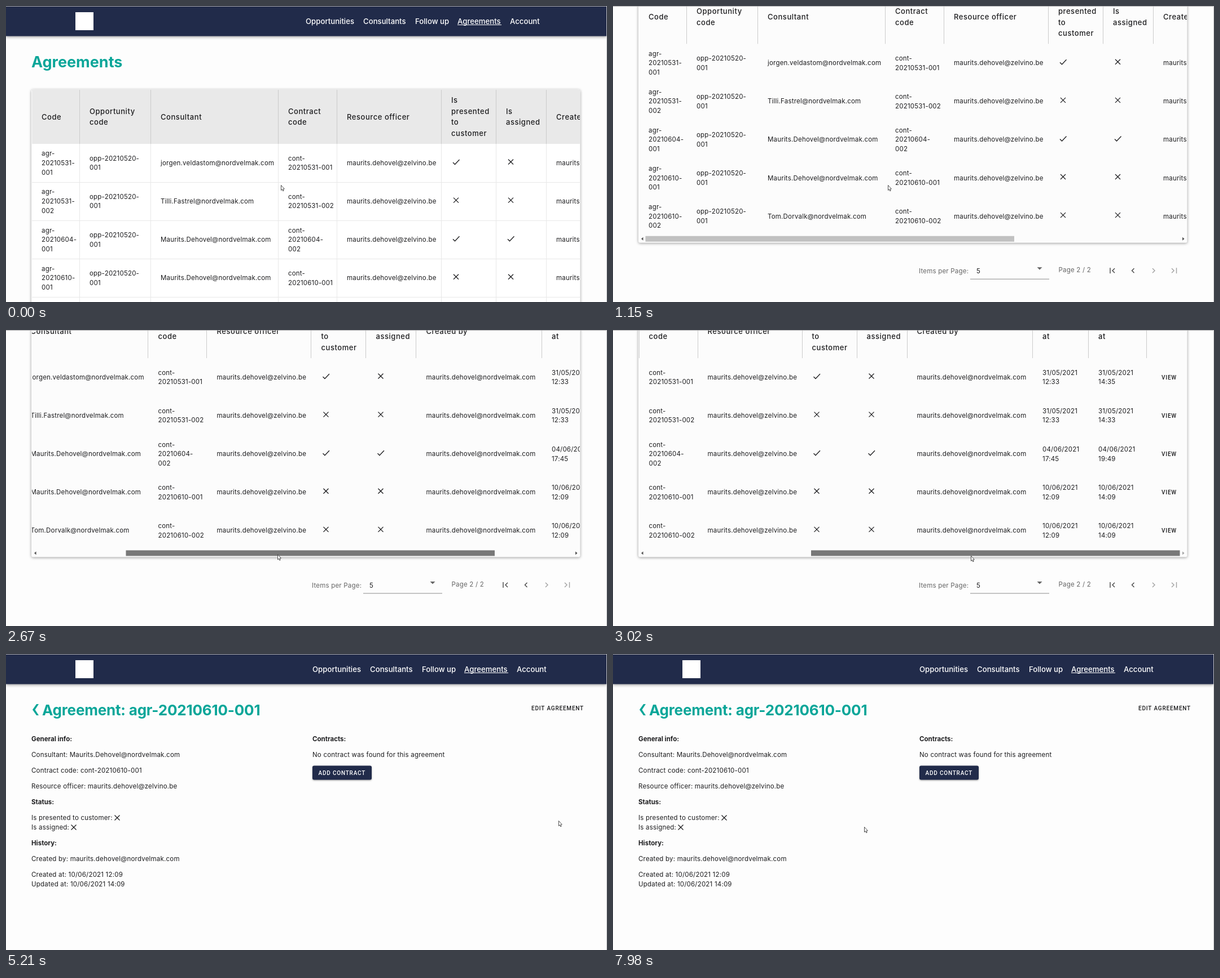
An HTML page with a canvas that plays this animation: 1065x526 px, repeating every 8 s.

```html
<!DOCTYPE html>
<html lang="en">
<head>
<meta charset="utf-8">
<title>Agreements</title>
<style>
html, body { margin: 0; width: 100%; height: 100%; overflow: hidden; background: #fdfdfd; }
canvas { display: block; }
</style>
</head>
<body>
<canvas id="stage" width="1065" height="526"></canvas>
<script>
const ctx = document.getElementById('stage').getContext('2d');
const W = 1065, H = 526, LOOP = 8000, OPEN = 4960;
const NAVY = '#212b4a', TEAL = '#0aa699', INK = '#1d1d1f';
const SANS = 'Inter, "Open Sans", sans-serif', CAPS = 'Roboto, Arial, sans-serif';

const FONT = {
  body: [`400 11.5px ${SANS}`, 0.2],
  bold: [`700 11.5px ${SANS}`, 0],
  head: [`500 13px ${SANS}`, 0.55],
  nav: [`500 13.2px ${SANS}`, 0],
  title: [`700 27px ${SANS}`, 0],
  detail: [`700 26px ${SANS}`, -0.2],
  button: [`500 10px ${CAPS}`, 0.8]
};

const OFFICER = 'maurits.dehovel@zelvino.be';
const CREATOR = 'maurits.dehovel@nordvelmak.com';
const CONSULTANT = 'Maurits.Dehovel@nordvelmak.com';

const COLS = [45, 131, 257, 483, 587, 772, 869, 958, 1180.5, 1279.5, 1382.5];
const HEADS = ['Code', 'Opportunity|code', 'Consultant', 'Contract|code', 'Resource officer',
  'Is|presented|to|customer', 'Is|assigned', 'Created by', 'Created|at', 'Updated|at', ''];
const row = (date, no, who, cont, shown, assigned, made, changed) => {
  const day = `${date.slice(6)}/${date.slice(4, 6)}/${date.slice(0, 4)}|`;
  return [`agr-|${date}-|${no}`, 'opp-20210520-|001', who, `cont-|${date}-${cont}`, OFFICER,
    shown, assigned, CREATOR, day + made, day + changed];
};
const ROWS = [
  row('20210531', '001', 'jorgen.veldastom@nordvelmak.com', '001', true, false, '12:33', '14:35'),
  row('20210531', '002', 'Tilli.Fastrel@nordvelmak.com', '002', false, false, '12:33', '14:33'),
  row('20210604', '001', CONSULTANT, '|002', true, true, '17:45', '19:49'),
  row('20210610', '001', CONSULTANT, '001', false, false, '12:09', '14:09'),
  row('20210610', '002', 'Tom.Dorvalk@nordvelmak.com', '002', false, false, '12:09', '14:09')
];

// Keyframes: [time, value], eased between neighbours.
const SCROLL = [[500, 0], [720, 80], [820, 80], [980, 160], [1040, 160], [1260, 195]];
const NAV_UP = [[600, 0], [720, 24], [900, 62]];
const CURSOR_X = [[1350, 487], [2130, 326], [2250, 326], [2320, 326.7], [3020, 634],
  [3100, 634], [3900, 972], [3930, 972], [4600, 979], [5200, 979], [6140, 689],
  [6880, 689], [7610, 449], [7940, 449], [7980, 445]];
const CURSOR_Y = [[1350, 318], [2130, 396], [2320, 396], [3020, 401], [3100, 401],
  [3900, 312], [3930, 312], [4600, 296], [5200, 296], [6140, 308],
  [6880, 308], [7250, 316], [7610, 308], [7940, 308], [7980, 307]];

function at(keys, t) {
  if (t <= keys[0][0]) return keys[0][1];
  for (let i = 1; i < keys.length; i++) {
    const [t0, a] = keys[i - 1], [t1, b] = keys[i];
    if (t < t1) {
      const p = (t - t0) / (t1 - t0);
      return a + (b - a) * p * p * (3 - 2 * p);
    }
  }
  return keys[keys.length - 1][1];
}

function rect(x, y, w, h, color) {
  ctx.fillStyle = color;
  ctx.fillRect(x, y, w, h);
}

function line(points, color, width = 1, close = false) {
  ctx.beginPath();
  points.forEach(([x, y]) => ctx.lineTo(x, y));
  if (close) ctx.closePath();
  ctx.strokeStyle = color;
  ctx.lineWidth = width;
  ctx.stroke();
}

function shape(points, color) {
  ctx.beginPath();
  points.forEach(([x, y]) => ctx.lineTo(x, y));
  ctx.closePath();
  ctx.fillStyle = color;
  ctx.fill();
}

function box(x, y, w, h, r, color, shadow = 0) {
  ctx.save();
  if (shadow) {
    ctx.shadowColor = 'rgba(0,0,0,.4)';
    ctx.shadowBlur = shadow;
    ctx.shadowOffsetY = 1;
  }
  ctx.beginPath();
  ctx.roundRect(x, y, w, h, r);
  ctx.fillStyle = color;
  ctx.fill();
  ctx.restore();
}

// y is the middle of the line
function text(str, x, y, font = 'body', color = INK) {
  const [face, gap] = FONT[font];
  ctx.font = face;
  ctx.letterSpacing = gap + 'px';
  ctx.fillStyle = color;
  ctx.fillText(str, x, y);
}

function lines(str, x, mid, step, font) {
  const parts = str.split('|');
  parts.forEach((s, i) => text(s, x, mid + (i - (parts.length - 1) / 2) * step, font));
}

function mark(x, y, yes) {
  if (yes) return line([[x - 5.5, y + 1], [x - 2, y + 4.5], [x + 6, y - 4]], INK, 1.3);
  line([[x - 4.5, y - 4.5], [x + 4.5, y + 4.5]], INK, 1.3);
  line([[x + 4.5, y - 4.5], [x - 4.5, y + 4.5]], INK, 1.3);
}

function drawNav(shift, up) {
  ctx.save();
  ctx.translate(0, -up);
  box(0, -10, 1064, 63.5, 0, NAVY, 5);
  rect(123, 11, 32, 32, '#fff');
  const links = [['Opportunities', 531], ['Consultants', 633], ['Follow up', 725],
    ['Agreements', 800], ['Account', 893]];
  links.forEach(([name, x]) => text(name, x + shift, 32, 'nav', '#fff'));
  rect(800 + shift, 33, 78, 1, '#fff');
  ctx.restore();
}

function drawTable(drag, faded, t, hover) {
  const hx = drag * 436.5 / 293.5;
  box(45, 148.5, 972.5, 450, 3, faded ? '#fcfcfc' : '#fff', 5);
  ctx.save();
  ctx.beginPath();
  ctx.rect(46, 149, 971, 449);
  ctx.clip();
  if (!faded) rect(46, 149, 971, 96, '#e9e9e9');
  ctx.translate(-hx, 0);
  COLS.forEach((x, i) => {
    if (i) {
      rect(Math.round(x - hx) + hx - 1, 149, 1, 96, '#cbcbcb');
      if (!faded) rect(x - 1, 245, 1, 340, '#e8e8e8');
      else if (t > 3400 && i > 5 && i < 10) rect(Math.round(x - hx) + hx - 1, 542, 1, 43, '#e8e8e8');
    }
    lines(HEADS[i], x + (i ? 17 : 18), 201.5, 19.5, 'head');
  });
  ROWS.forEach((cells, r) => {
    const mid = 279 + r * 68.1;
    if (!faded) rect(46, Math.round(mid + 33.5), 1410, 1, '#e8e8e8');
    cells.forEach((cell, i) => {
      const x = COLS[i] + (i ? 17 : 18);
      if (typeof cell === 'boolean') mark(x + 8.5, mid - 2, cell);
      else lines(cell, x, mid + 4, 16.7, 'body');
    });
    if (hover && r === 3) box(1399, mid - 12, 46, 24, 3, '#f5f6f7');
    text('VIEW', 1408.5, mid + 3.5, 'button');
  });
  ctx.restore();

  if (!faded) rect(46, 585, 971, 13, '#f1f1f1');
  const active = t > 2090 && t < 3100;
  rect(57.5 + drag, 586.5, 653.5, 10, active ? '#787878' : '#c1c1c1');
  shape([[50, 591.5], [53.5, 588.5], [53.5, 594.5]], '#505050');
  shape([[1012.5, 591.5], [1009, 588.5], [1009, 594.5]], drag > 293 ? '#a3a3a3' : '#505050');
}

function drawPager() {
  const grey = '#666', pale = '#a0a0a0', y = 648;
  text('Items per Page:', 542, 652.5, 'body', grey);
  text('5', 644, 653);
  rect(633, 662.5, 140, 1, '#8c8c8c');
  shape([[751.5, 642], [760.5, 642], [756, 646.5]], grey);
  text('Page 2 / 2', 789.5, 650.5, 'body', grey);
  const chevron = (x, dir, color) =>
    line([[x - 2 * dir, y - 4], [x + 2 * dir, y], [x - 2 * dir, y + 4]], color, 1.4);
  line([[881, y - 5], [881, y + 5]], '#444', 1.4);
  chevron(887, -1, '#444');
  chevron(921.5, -1, '#444');
  chevron(958, 1, pale);
  chevron(992, 1, pale);
  line([[998.5, y - 5], [998.5, y + 5]], pale, 1.4);
}

function drawList(t, drag, hover) {
  ctx.save();
  ctx.translate(0, -at(SCROLL, t));
  text('Agreements', 45, 109, 'title', TEAL);
  drawTable(drag, t >= 820, t, hover);
  drawPager();
  ctx.restore();
  const up = at(NAV_UP, t);
  if (up < 62) drawNav(0, up);
}

function drawDetail() {
  drawNav(12, 0);
  shape([[54, 89], [58, 89], [51.5, 99], [58, 109], [54, 109], [47, 99]], TEAL);
  text('Agreement: agr-20210610-001', 64, 108.5, 'detail', TEAL);
  text('EDIT AGREEMENT', 931, 100, 'button');
  const info = [
    ['General info:', 151, 'bold'], [`Consultant: ${CONSULTANT}`, 179],
    ['Contract code: cont-20210610-001', 207], [`Resource officer: ${OFFICER}`, 235],
    ['Status:', 263, 'bold'], ['Is presented to customer:', 291], ['Is assigned:', 308],
    ['History:', 336, 'bold'], [`Created by: ${CREATOR}`, 364],
    ['Created at: 10/06/2021 12:09', 392], ['Updated at: 10/06/2021 14:09', 409]
  ];
  info.forEach(([str, y, font]) => text(str, 45, y + 4, font));
  mark(197, 291, false);
  mark(120, 308, false);
  text('Contracts:', 543, 155, 'bold');
  text('No contract was found for this agreement', 543, 183);
  box(543, 198.5, 105, 25, 3, NAVY, 3);
  text('ADD CONTRACT', 553.5, 214.8, 'button', '#fff');
}

function drawCursor(x, y, hand) {
  ctx.save();
  ctx.translate(x, y);
  ctx.lineJoin = 'round';
  const points = hand
    ? [[-1, 1], [0, 0.3], [1, 1], [1, 5], [5, 6], [6, 7], [5.5, 10.5], [4, 13],
      [-1, 13], [-4, 9], [-3.5, 7.5], [-1, 9]]
    : [[0.5, 0.5], [0.5, 9.5], [2.4, 7.8], [3.8, 10.8], [5.2, 10.2], [3.9, 7.3], [6.4, 7]];
  shape(points, '#fff');
  line(points, '#3c3c3c', 0.9, true);
  ctx.restore();
}

function draw(t) {
  const x = at(CURSOR_X, t), y = at(CURSOR_Y, t);
  const hand = t > 3900 && t < OPEN && y < 300;
  const drag = t < 2250 ? 0 : t > 3020 ? 293.5 : Math.min(293.5, x - 326);
  rect(0, 0, W, H, '#fdfdfd');
  if (t < OPEN) drawList(t, drag, hand);
  else drawDetail();
  rect(0, 0, W, 1, '#a9a9ab');
  rect(1064, 0, 1, H, '#c4c4c6');
  drawCursor(x, y, hand);
}

const start = performance.now();
function tick() {
  draw((performance.now() - start) % LOOP);
  requestAnimationFrame(tick);
}
tick();
</script>
</body>
</html>
```
